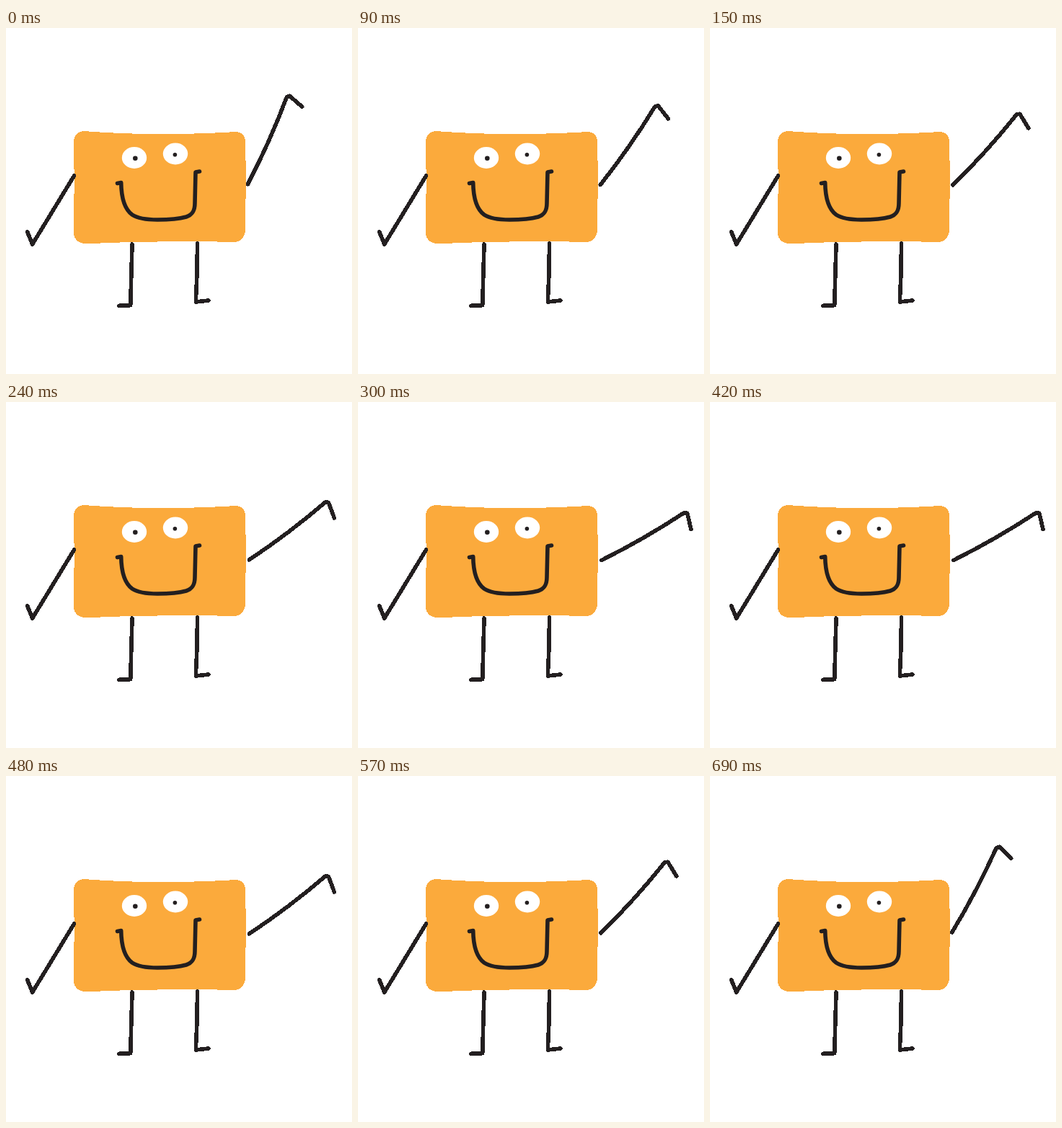
An HTML page that plays this animation: 480 px wide and 480 px high, repeating every 0.72 s.

```html
<!DOCTYPE html>
<html lang="en">
<head>
<meta charset="utf-8">
<title>Waving box</title>
<style>
  html, body { margin: 0; width: 100%; height: 100%; overflow: hidden; background: #fff; }
  svg { display: block; width: 100%; height: 100%; }
  .ink { fill: none; stroke: #231f20; stroke-width: 5.6; stroke-linecap: round; stroke-linejoin: round; }
  .crisp { shape-rendering: crispEdges; }
</style>
</head>
<body>
<svg viewBox="0 0 480 480">
  <path class="crisp" fill="#fbaa3c" d="M94 157Q95 144 108 143Q160 147 215 147.3Q270 147 319 144Q331 145 332 157
    L333 210L331.700 283Q330 295 318 297Q260 295.500 210 296.500Q160 297 110 299.300Q96 298 94 286L94.700 210Z"/>
  <g fill="#fff">
    <ellipse cx="178" cy="180" rx="17.200" ry="15"/>
    <ellipse cx="235" cy="174.500" rx="17.200" ry="15"/>
  </g>
  <g fill="#231f20">
    <circle cx="179.300" cy="180.800" r="3.300"/>
    <circle cx="234.400" cy="175.800" r="2.800"/>
  </g>
  <path class="ink" d="M154.500 215.500L159.700 214.500C160 236 164 251 175 259C184 265 196 266 210 266C228 266 243 264 250 262C259 259 262 253 262 243L263 200L268.500 199"/>
  <g class="ink crisp">
    <path d="M94.500 205L36.600 300L29.700 283"/>
    <path d="M175 300L172.700 384.700L157 385.300"/>
    <path d="M265.500 299L265 340L263.300 380L281 378"/>
    <path id="arm" d="M335.400 216.800Q366.200 157.800 389.400 96L393.400 94.200L410.700 109.200"/>
  </g>
</svg>
<script>
  const arm = document.getElementById('arm');
  const STEP_MS = 30, STEPS = 24, STEP_DEG = 3.6;

  function draw() {
    const step = Math.floor(performance.now() / STEP_MS) % STEPS;
    const angle = STEP_DEG * Math.min(step, STEPS - step);
    arm.setAttribute('transform', `rotate(${angle} 332.500 222)`);
    requestAnimationFrame(draw);
  }
  draw();
</script>
</body>
</html>
```
